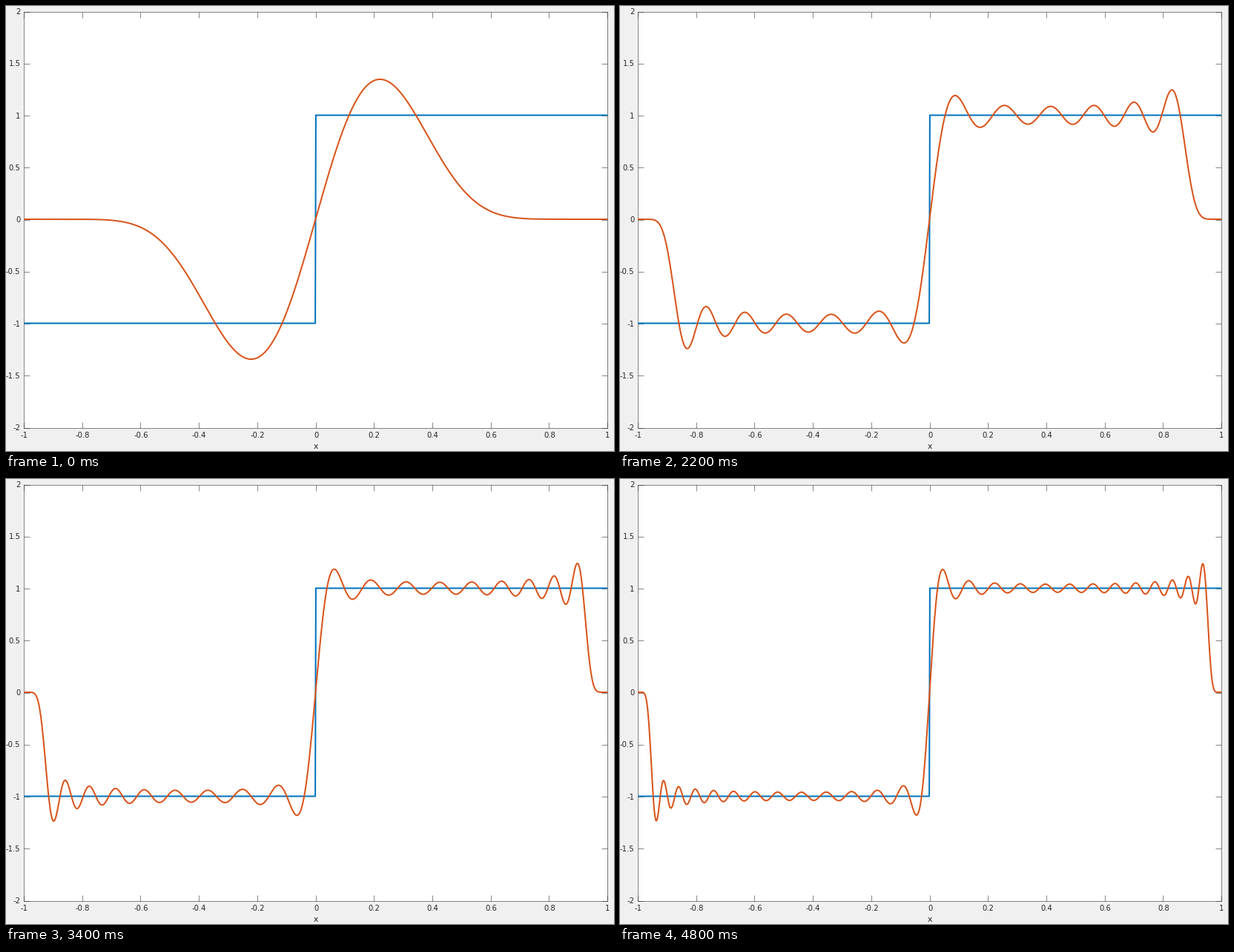
Animation of 820 by 601 pixels, one loop 5000 ms. Source, as a matplotlib script:

```python
import numpy as np
import matplotlib.pyplot as plt
from matplotlib.animation import FuncAnimation
from matplotlib.transforms import Affine2D

W, H, DPI = 820, 601, 64
PX = 72 / DPI                                # one pixel in points
LEFT, RIGHT, TOP, BOTTOM = 24, 811, 7.55, 569.55
INK = "#262626"
FRAMES, INTERVAL = 25, 200
LAM = 20                                     # Gegenbauer parameter


def odd_basis(x, count):
    """Odd Gegenbauer functions, orthonormal on [-1, 1]."""
    nodes, weights = np.polynomial.legendre.leggauss(200)
    norm = np.sqrt(np.sum(weights * (1 - nodes**2) ** (LAM - 0.5)))

    def step(n):
        return np.sqrt(n * (n + 2 * LAM - 1) / (4 * (n + LAM) * (n + LAM - 1)))

    rows = [(1 - x**2) ** ((LAM - 0.5) / 2) / norm]
    rows.append(x * rows[0] / step(1))
    for n in range(2, 2 * count):
        rows.append((x * rows[-1] - step(n - 1) * rows[-2]) / step(n))
    return np.array(rows[1::2])


# Least-squares partial sums of the sign function
x = np.linspace(-1, 1, 1000)
nodes, weights = np.polynomial.legendre.leggauss(200)
coefs = odd_basis((nodes + 1) / 2, FRAMES) @ weights
sums = np.cumsum(coefs[:, None] * odd_basis(x, FRAMES), axis=0)

plt.rcParams["font.family"] = "DejaVu Sans"
fig = plt.figure(figsize=(W / DPI, H / DPI), dpi=DPI, facecolor="#f0f0f0")
ax = fig.add_axes([LEFT / W, 1 - BOTTOM / H, (RIGHT - LEFT) / W, (BOTTOM - TOP) / H])
ax.set(xlim=(-1, 1), ylim=(-2, 2), facecolor="white")
x_ticks, y_ticks = np.linspace(-1, 1, 11), np.linspace(-2, 2, 9)
ax.set_xticks(x_ticks)
ax.set_yticks(y_ticks)
ax.tick_params(direction="in", top=True, right=True, length=7.9 * PX, width=0.55 * PX,
               color=INK, labelbottom=False, labelleft=False)
for spine in ax.spines.values():
    spine.set(linewidth=0.55 * PX, edgecolor=INK)


def label(px, py, text, size=10, ha="center"):
    fig.text(px / W, 1 - py / H, text, fontsize=size * PX, color=INK,
             ha=ha, va="baseline")


def number(value):
    return f"{round(value, 1) + 0.0:g}"


for v in x_ticks:
    label(LEFT + (v + 1) / 2 * (RIGHT - LEFT) + 0.5, 583, number(v))
for v in y_ticks:
    label(19.5, BOTTOM - (v + 2) / 4 * (BOTTOM - TOP) + 3.7, number(v), ha="right")
label(418, 598, "x", size=11)

# Curves sit half a pixel above the pixel-snapped frame
raised = ax.transData + Affine2D().translate(0, 0.55)
ax.plot(x, np.sign(x), color="#0072bd", lw=2 * PX, zorder=3, transform=raised)
curve, = ax.plot(x, sums[0], color="#d95319", lw=2 * PX, zorder=4, transform=raised)


def draw(frame):
    curve.set_ydata(sums[frame])
    return (curve,)


anim = FuncAnimation(fig, draw, frames=FRAMES, interval=INTERVAL,
                     init_func=lambda: draw(0), repeat=True, repeat_delay=0)
plt.show()
```
